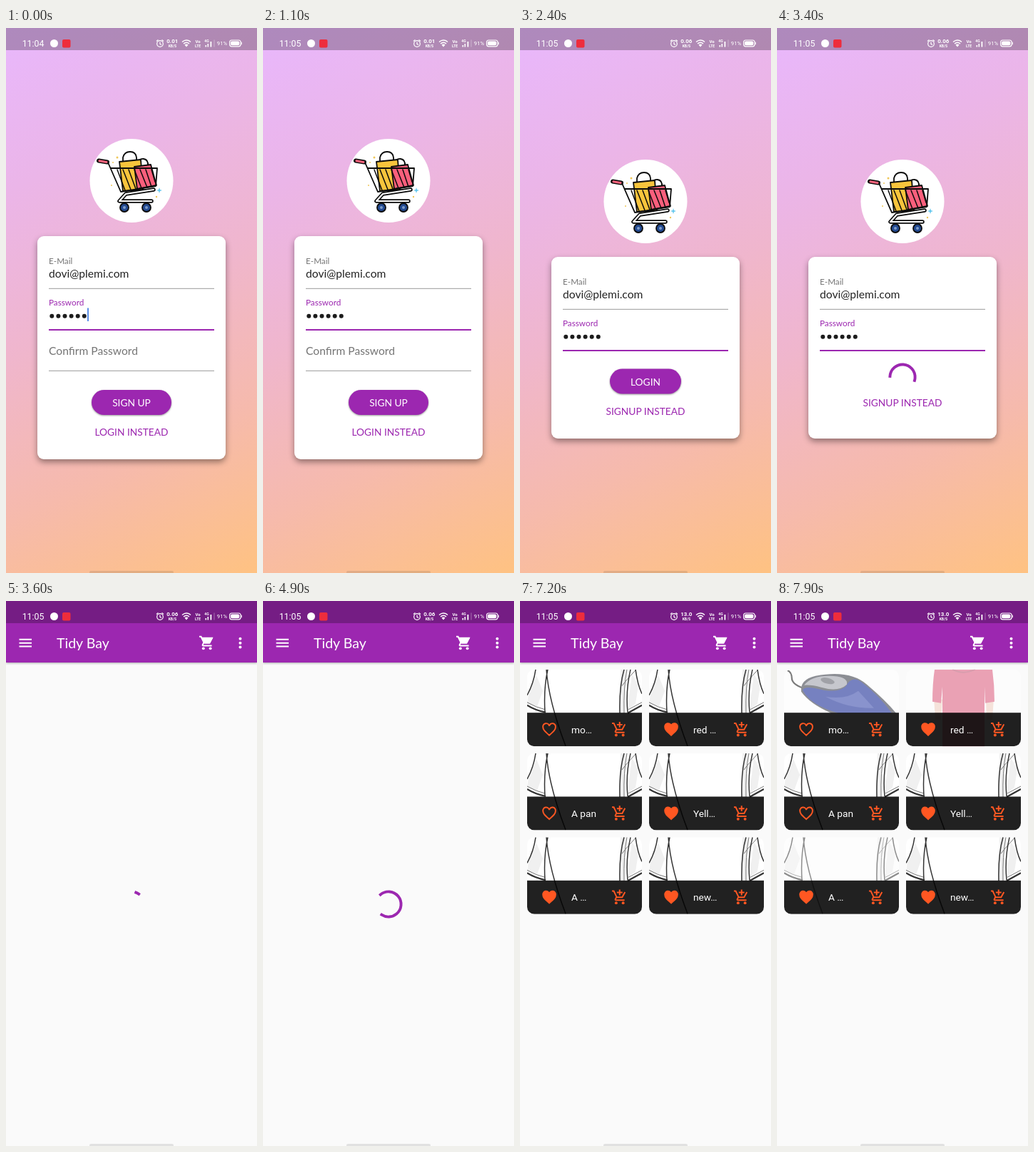
An HTML page for the animation above (8 s loop, 352 by 762 pixels).

```html
<!DOCTYPE html>
<html lang="en">
<head>
<meta charset="utf-8">
<title>Shop login</title>
<style>
html, body { margin: 0; width: 100%; height: 100%; overflow: hidden; background: #fafafa }
svg { display: block; width: 352px; height: 762px; font: 15.65px Lato, sans-serif }
.small { font-size: 11.74px }
.button { font-size: 13.75px; text-anchor: middle }
.purple { fill: #9c27b0 }
.grey { fill: #757575 }
.roboto { font-family: Roboto, sans-serif }
.line { fill: none; stroke: currentColor; stroke-width: 2 }
.ink { stroke: #0b0b0b; stroke-width: 1.8; stroke-linejoin: round; stroke-linecap: round }
.spinner { fill: none; stroke: #9c27b0; stroke-width: 3.9; stroke-linecap: square }
#sheet { filter: drop-shadow(0 4px 4px #0006) }
#pill { filter: drop-shadow(0 1.5px 1px #0006) }
#bar { filter: drop-shadow(0 1.5px 1.5px #0005) }
/* middle stops keep the blend unpremultiplied */
#backdrop { width: 352px; height: 762px;
  background: linear-gradient(155.2deg, rgba(215,117,255,.5), rgba(225,135,220,.6), rgba(235,153,186,.7), rgba(245,170,152,.8), rgba(255,188,117,.9)) }
</style>
</head>
<body>
<svg viewBox="0 0 352 762">
<defs>
  <clipPath id="tileClip"><rect width="161" height="107.5" rx="10"/></clipPath>
  <path id="heart" d="M12 20C5 13.700 3 11.700 3 8.500A4.500 4.500 0 0 1 12 6.700A4.500 4.500 0 0 1 21 8.500C21 11.700 19 13.700 12 20z" stroke="currentColor" stroke-width="2"/>
  <g id="cartFrame">
    <path class="line" d="M1 3h2.600l4.300 9h7.700l4.100-7.500M7.300 12l-1.400 2.600q-.6 1.400 1 1.400H19"/>
    <circle cx="7" cy="20" r="2" fill="currentColor"/><circle cx="17" cy="20" r="2" fill="currentColor"/>
  </g>
  <g id="tee">
    <rect width="161" height="108" fill="#fff"/>
    <path d="M2 34L13 8L22 30L14 52L0 48z M131 0H140Q136 30 137 61H129z M147 6L156 22L152 48L141 56z" fill="#f0f0f0"/>
    <g fill="none" stroke="#333">
      <path d="M0 46Q12 53 25 56 M140 0Q135 26 136 61 M153 0Q138 16 133 23 M142 56L161 46" stroke="#777"/>
      <path d="M12 0Q9 20 0 36 M27 0Q30 44 54 107 M29 0Q23 26 25 60 M136 0Q129 24 130 61 M145 0Q138 30 141 60 M152 0Q155 22 161 34" stroke-width="1.500"/>
      <path d="M0 50Q11 57 26 60 M141 61L161 50" stroke-width="2.200"/>
    </g>
  </g>
  <g id="mouse">
    <rect width="161" height="108" fill="#fff"/>
    <path d="M4 1Q11 3 11 14Q13 22 30 27" fill="none" stroke="#222" stroke-width="2.200"/>
    <path d="M24 31Q22 14 44 9Q92 0 116 21Q142 43 157 61H66Q36 48 24 31z" fill="#41444f"/>
    <path d="M26 29Q28 23 47 27Q74 34 86 24Q95 7 109 18Q134 37 151 61H76Q37 50 26 29z" fill="#1c2e98"/>
    <path d="M28 22Q38 9 63 9Q90 9 88 21Q76 32 52 25Q38 21 28 22z" fill="#a2a5ae"/>
    <ellipse cx="61" cy="16" rx="10" ry="4" fill="#62656e" transform="rotate(14 61 16)"/>
    <path d="M58 38Q86 43 104 30L126 54Q90 55 58 38z" fill="#3c4cae"/>
  </g>
  <g id="shirt">
    <rect width="161" height="108" fill="#fff"/>
    <path d="M39 40L51 42L49 70H41z M112 42L123 40L121 70H113z" fill="#eec2b0"/>
    <path d="M40 0H121Q124 22 124 45L111 47L110 24V108H51V24L49 47L37 45Q37 20 40 0z" fill="#d42a56"/>
    <path d="M65 0Q80 8 97 0" fill="none" stroke="#aa2045" stroke-width="2"/>
  </g>
</defs>

<g id="login">
  <foreignObject width="352" height="762"><div id="backdrop"></div></foreignObject>
  <g id="badge">
    <circle cx="176" cy="213.500" r="58.500" fill="#fff"/>
    <g class="ink">
      <path d="M164 188V181Q166 173 174 173Q182 173 183 181V188 M184 192Q186 182 193 183Q200 184 199 193" fill="none"/>
      <path d="M159 187L189 184L192 226L164 228z" fill="#f8c43c"/>
      <path d="M180 194L203 191L211 220L184 225z" fill="#fb5f7c"/>
      <path d="M143 188L161 229L210 221L212 196H147" fill="none"/>
      <path d="M156 198L167 227M164 198L175 226M172 198L182 225M180 198L190 224M188 198L198 223M196 198L204 222M204 198L209 215" fill="none" stroke-width="1.500"/>
      <g id="chassis" fill="none">
        <path d="M207 226L168 232L159 242H204" stroke-width="5.500"/>
        <path d="M207 226L168 232L159 242H204" stroke="#fff" stroke-width="2.200"/>
      </g>
      <path d="M130 185.500L142 187.500" stroke-width="6"/><path d="M131 185.700L141 187.400" stroke="#f8637c" stroke-width="3"/>
      <circle cx="166" cy="251" r="6" fill="#234a91"/><circle cx="197" cy="251" r="6" fill="#234a91"/>
    </g>
    <g fill="#7d9cc9"><circle cx="166" cy="251" r="2"/><circle cx="197" cy="251" r="2"/></g>
    <g fill="#efc75a"><circle cx="156" cy="181" r="1.500"/><circle cx="150" cy="188" r="1"/><circle cx="148" cy="220" r="1"/><circle cx="211" cy="236" r="1.200"/></g>
    <path d="M215 223l1 3 3 1-3 1-1 3-1-3-3-1 3-1z" fill="#65c8ee"/>
  </g>
  <!-- card content is placed relative to the card's top edge -->
  <g id="card">
    <rect id="sheet" x="44" width="264" rx="9" fill="#fff"/>
    <text class="small grey" x="60" y="39">E-Mail</text>
    <text x="60" y="58" fill="#222">dovi@plemi.com</text>
    <path d="M60 73.300H292" stroke="#999"/>
    <text class="small purple" x="60" y="96.500">Password</text>
    <g id="dots" fill="#1c1c1c"></g>
    <rect id="cursor" x="114" y="100.500" width="2" height="18.500" fill="#5b8fe8"/>
    <path d="M60 131H292" stroke="#9c27b0" stroke-width="2"/>
    <g id="confirm">
      <text class="grey" x="60" y="165.700">Confirm Password</text>
      <path d="M60 188.300H292" stroke="#999"/>
    </g>
    <g id="actions">
      <g id="submit">
        <rect id="pill" class="purple" height="35" rx="17.500"/>
        <text id="submitText" class="button" x="176" y="23" fill="#fff"></text>
      </g>
      <circle class="spinner" r="17.600"/>
      <text id="switchText" class="button purple" x="176"></text>
    </g>
  </g>
</g>

<g id="shop">
  <rect width="352" height="762" fill="#fafafa"/>
  <g id="grid" class="roboto" style="font-size:13.700px;color:#ff5722"></g>
  <circle class="spinner" r="17.600"/>
  <rect id="bar" class="purple" width="352" height="86"/>
  <g fill="#fff" style="color:#fff">
    <path d="M18.500 53.800H36M18.500 58.700H36M18.500 63.600H36" class="line"/>
    <text x="71" y="66" font-size="19.560">Tidy Bay</text>
    <g transform="translate(270 46.800) scale(.978)"><use href="#cartFrame"/><path d="M4.500 4H21L16.500 13H8.500z"/></g>
    <circle cx="328.500" cy="52.800" r="2"/><circle cx="328.500" cy="58.700" r="2"/><circle cx="328.500" cy="64.600" r="2"/>
  </g>
</g>

<rect width="352" height="31" fill="#000" opacity=".25"/>
<g class="roboto" fill="#fff" style="color:#fff" text-anchor="middle">
  <text id="clock" x="38" y="25.700" font-size="12.300"></text>
  <circle cx="67.500" cy="21.500" r="5.500"/>
  <rect x="79" y="16" width="11.500" height="11.500" rx="2" fill="#ee2d3c"/>
  <g fill="none" stroke="#fff" stroke-width="1.200">
    <circle cx="216" cy="22" r="4.300"/><path d="M216 19.500V22.300L218 23.500M211 18.500L213.500 16.500M221 18.500L218.500 16.500"/>
    <path d="M247 19.500Q253 14.500 259 19.500M249 22Q253 18.500 257 22" stroke-width="1.500"/>
    <rect x="313.600" y="17" width="15.500" height="8.800" rx="3"/>
  </g>
  <path d="M250.500 23.500Q253 21.500 255.500 23.500L253 26.500z"/>
  <g font-weight="700">
    <text id="rate" x="233.300" y="21" font-size="8"></text>
    <text x="233.300" y="27" font-size="5">KB/S</text>
    <text x="269" y="21" font-size="6">Vo</text>
    <text x="269" y="26.500" font-size="5">LTE</text>
    <text x="281.500" y="20" font-size="5">4G</text>
  </g>
  <path d="M279.500 24h1.600v2.500h-1.600zM282.500 22h1.600v4.500h-1.600zM286.500 19h1.800v7.500h-1.800z"/>
  <path d="M292 16.500V26.500" stroke="#fff" stroke-width=".6" opacity=".6"/>
  <text x="303" y="24.300" font-size="7.700">91%</text>
  <rect x="315" y="18.500" width="12.300" height="5.800" rx="1.800"/><rect x="329.800" y="19.700" width="1" height="3.500"/>
</g>
<rect x="117" y="759" width="118" height="4" rx="2" fill="#000" opacity=".1"/>
</svg>

<script>
const LOOP = 8000, FRAME = 100, SPEED = 1.305;
const SWITCH = 1700, SUBMIT = 2750, OPEN = 3530, STALL = 6600, LOADED = 6900, PLACEHOLDER = 7000;

const $ = id => document.getElementById(id);
const clamp = v => Math.min(1, Math.max(0, v));
const set = (el, attrs) => { for (const k in attrs) el.setAttribute(k, attrs[k]); };
const show = (el, on) => set(el, { visibility: on ? 'inherit' : 'hidden' });
const move = (el, x, y) => set(el, { transform: `translate(${x} ${y})` });

function bezier(x1, y1, x2, y2) {
  const at = (a, b, s) => 3 * a * s * (1 - s) ** 2 + 3 * b * s * s * (1 - s) + s ** 3;
  return x => {
    let lo = 0, hi = 1;
    for (let i = 0; i < 18; i++) {
      const mid = (lo + hi) / 2;
      if (at(x1, x2, mid) < x) lo = mid; else hi = mid;
    }
    return x <= 0 ? 0 : x >= 1 ? 1 : at(y1, y2, lo);
  };
}
const easeIn = bezier(.42, 0, 1, 1), easeOut = bezier(0, 0, .58, 1), fastOutSlowIn = bezier(.4, 0, .2, 1);

const products = [
  { title: 'mo…', photo: 'mouse', ready: 7280 },
  { title: 'red …', liked: true, photo: 'shirt', ready: 7350 },
  { title: 'A pan' },
  { title: 'Yell…', liked: true },
  { title: 'A …', liked: true, ready: 7830 },
  { title: 'new…', liked: true },
];

$('dots').innerHTML = [0, 1, 2, 3, 4, 5].map(i => `<circle cx="${64.3 + i * 9.1}" cy="111.700" r="3"/>`).join('');
$('grid').innerHTML = products.map((p, i) => `
  <g transform="translate(${10 + i % 2 * 171} ${95.7 + (i >> 1) * 117.3})"><g clip-path="url(#tileClip)">
    <use class="tee" href="#tee"/>
    ${p.photo ? `<use class="photo" href="#${p.photo}"/>` : ''}
    <rect y="60.500" width="161" height="47" opacity=".87"/>
    <use href="#heart" transform="translate(19.300 72.500) scale(.978)" fill="${p.liked ? 'currentColor' : 'none'}"/>
    <text x="62" y="89" fill="#fff">${p.title}</text>
    <g transform="translate(118 72.300) scale(.978)"><use href="#cartFrame"/><path class="line" d="M12 1V9M8 5H16"/></g>
  </g></g>`).join('');
const tiles = [...$('grid').children];
const [loginSpinner, shopSpinner] = document.querySelectorAll('.spinner');

// Material indeterminate progress ring
function spin(el, x, y, ms) {
  const phase = ms / 1333 % 1;
  const head = 270 * fastOutSlowIn(phase * 2), tail = 270 * fastOutSlowIn(phase * 2 - 1);
  const start = -90 + tail + ms / 2222 * 360 + phase * 90;
  const sweep = Math.max(head - tail, .06) * Math.PI / 180 * 17.6;
  set(el, { transform: `translate(${x} ${y}) rotate(${start})`, 'stroke-dasharray': `${sweep} 200` });
}

function drawLogin(t) {
  const signup = t < SWITCH, busy = t >= SUBMIT;
  const p = easeIn(clamp((t - SWITCH) * SPEED / 300));
  move($('badge'), 0, 29 * p);
  move($('card'), 0, 291 + 29 * p);
  set($('sheet'), { height: 312 - 58 * p });
  show($('cursor'), !busy && (t + 300) % 766 < 383);
  move($('confirm'), 0, -88 * p);
  set($('confirm'), { opacity: 1 - p });
  move($('actions'), 0, 215 - 58.5 * p);
  show($('submit'), !busy);
  show(loginSpinner, busy);
  set($('pill'), signup ? { x: 120, width: 112 } : { x: 126, width: 100 });
  $('submitText').textContent = signup ? 'SIGN UP' : 'LOGIN';
  $('switchText').textContent = signup ? 'LOGIN INSTEAD' : 'SIGNUP INSTEAD';
  set($('switchText'), { y: busy ? 52 : 64 });
  if (busy) spin(loginSpinner, 176, 11.6, (t - SUBMIT) * SPEED);
}

function drawShop(t) {
  show($('grid'), t >= LOADED);
  show(shopSpinner, t < LOADED);
  spin(shopSpinner, 176, 424, (Math.min(t, STALL) - OPEN) * SPEED);
  tiles.forEach((tile, i) => {
    const ms = (t - (products[i].ready ?? LOOP)) * SPEED;
    const photo = tile.querySelector('.photo');
    set(tile.querySelector('.tee'), { opacity: t < PLACEHOLDER ? 0 : 1 - easeOut(clamp(ms / 300)) });
    if (photo) set(photo, { opacity: easeIn(clamp((ms - 300) / 700)) });
  });
}

function draw(t) {
  const opened = t >= OPEN;
  show($('login'), !opened);
  show($('shop'), opened);
  $('clock').textContent = t < 500 ? '11:04' : '11:05';
  $('rate').textContent = t < 1700 ? '0.01' : t < 5900 ? '0.06' : '13.0';
  opened ? drawShop(t) : drawLogin(t);
}

function tick() {
  draw(Math.floor((performance.now() + 10) % LOOP / FRAME) * FRAME);
  requestAnimationFrame(tick);
}
tick();
</script>
</body>
</html>
```
